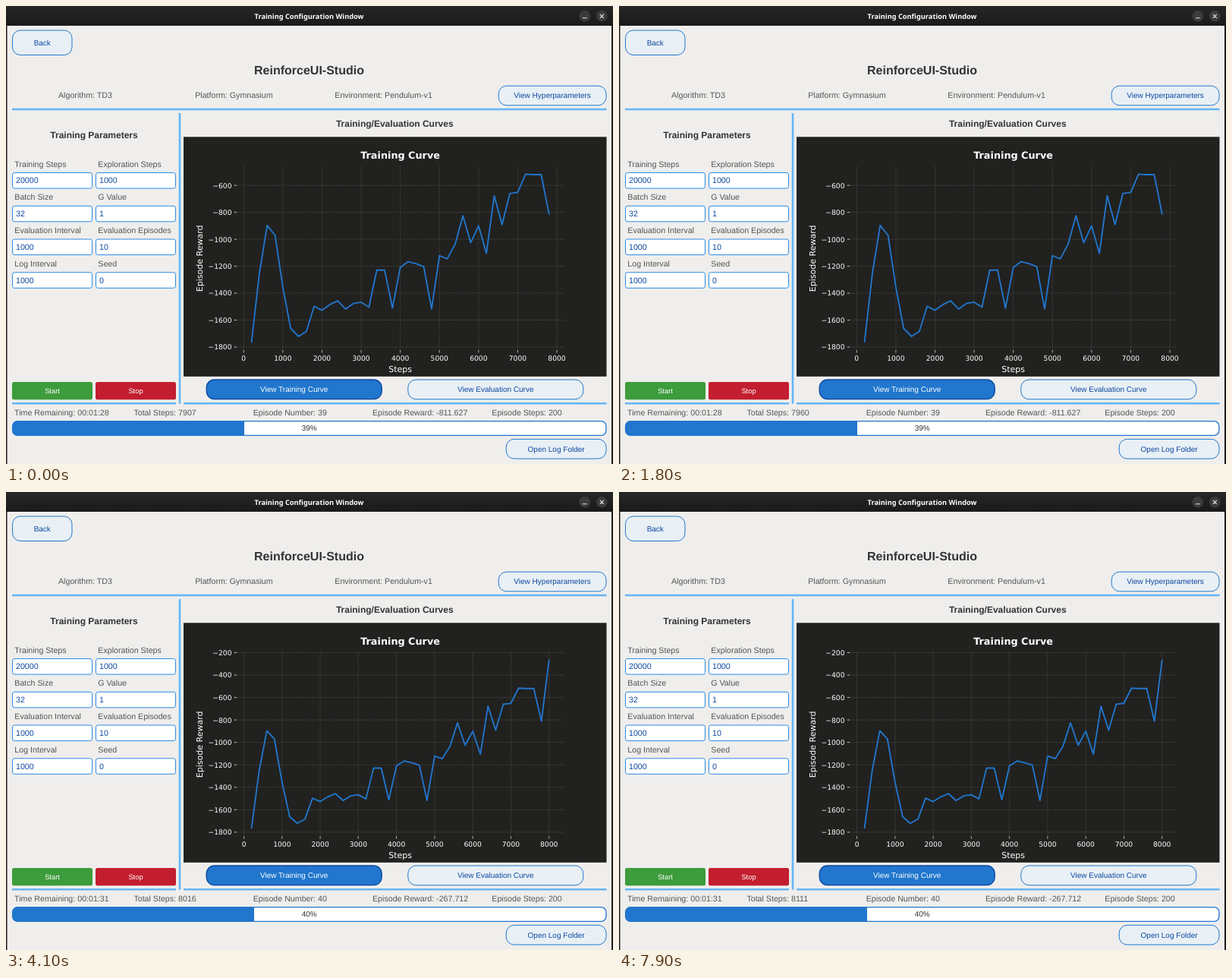
An HTML page for the animation above (8000 ms loop, 800 by 603 pixels).

```html
<!DOCTYPE html>
<html lang="en">
<head>
<meta charset="utf-8">
<title>Training Configuration Window</title>
<style>
  html, body { margin: 0; width: 100%; height: 100%; overflow: hidden; background: #1c1c1b; }
  svg { display: block; width: 100vw; height: 100vh; }
  text { font-family: "Liberation Sans", Arial, sans-serif; font-size: 10.67px; fill: #555; text-rendering: geometricPrecision; white-space: pre; }
  .head { font-weight: bold; font-size: 12px; fill: #333; }
  .button { font-size: 10px; fill: #0d47a1; }
  .value { fill: #0d47a1; }
  .plot text { font-family: "DejaVu Sans", sans-serif; font-size: 9.17px; fill: #fff; }
  .plot .axis { font-size: 11px; }
  .plot .caption { font-size: 12.8px; font-weight: bold; }
  .grid { stroke: #51514f; stroke-width: .6; stroke-dasharray: 2 .9; }
  .tick { stroke: #fff; stroke-width: .7; }
  .rule { stroke: #64b5f6; stroke-width: 2.6; }
</style>
</head>
<body>
<svg id="stage" viewBox="0 0 800 603" preserveAspectRatio="none"></svg>
<script>
const LOOP = 8000, STEP = 100;
const EPISODE_END = 3200, REDRAW = 3700;
const BLUE = '#2176cd';
const stage = document.getElementById('stage');

const rewards = [
  -1762, -1254, -897, -970, -1355, -1662, -1721, -1684, -1497, -1527,
  -1485, -1457, -1518, -1477, -1467, -1504, -1228, -1229, -1511, -1209,
  -1166, -1181, -1203, -1517, -1122, -1145, -1037, -826, -1026, -900,
  -1105, -677, -891, -660, -652, -517, -520, -520, -811.6, -267.7
];
// [time, total steps]
const progress = [
  [0, 7907], [1000, 7935], [1800, 7960], [EPISODE_END, 7999], [3500, 7999],
  [5300, 8050], [6700, 8086], [7900, 8111]
];

function add(parent, tag, attrs = {}, content = '') {
  const node = document.createElementNS('http://www.w3.org/2000/svg', tag);
  for (const key in attrs) node.setAttribute(key, attrs[key]);
  node.textContent = content;
  return parent.appendChild(node);
}
const label = (content, x, y, attrs = {}, parent = stage) => add(parent, 'text', { x, y, ...attrs }, content);
const centered = (content, x, y, cls, parent) => label(content, x, y, { class: cls, 'text-anchor': 'middle' }, parent);
const line = (parent, x1, y1, x2, y2, cls) => add(parent, 'line', { x1, y1, x2, y2, class: cls });
const box = (x, y, width, height, fill, attrs = {}) => add(stage, 'rect', { x, y, width, height, fill, ...attrs });

function button(content, x, y, width, height, active = false) {
  box(x + .5, y + .5, width - 1, height - 1, active ? BLUE : '#e8f0f5',
    { rx: 10.5, stroke: active ? '#0d47a1' : BLUE, 'stroke-width': active ? 1.3 : 1 });
  const text = centered(content, x + width / 2, y + height / 2 + 3.4, 'button');
  if (active) text.style.fill = '#fff';
}

function drawTitleBar() {
  const gradient = add(add(stage, 'defs'), 'linearGradient', { id: 'bar', x2: 0, y2: 1 });
  add(gradient, 'stop', { offset: 0, 'stop-color': '#272727' });
  add(gradient, 'stop', { offset: 1, 'stop-color': '#1a1a1a' });
  box(0, 0, 800, 603, '#1c1c1b');
  box(1.5, 26, 796.5, 577, '#efeeec');
  box(0, 0, 800, 26, 'url(#bar)');
  centered('Training Configuration Window', 399.5, 17)
    .setAttribute('style', 'font: bold 9.22px "Noto Sans", sans-serif; fill: #fff');
  for (const cx of [762.8, 785.3]) add(stage, 'circle', { cx, cy: 13.4, r: 7.3, fill: '#3b3b3b' });
  add(stage, 'path', { d: 'M760 15.7h5.6M782.8 10.9l5 5m0-5l-5 5', stroke: '#eee', 'stroke-width': 1.1 });
}

function drawHeader() {
  button('Back', 8, 31.5, 79.5, 33.5);
  const title = centered('ReinforceUI-Studio', 399.5, 90.3, 'head');
  title.style.fontSize = '16px';
  label('Algorithm: TD3', 69, 121.4);
  label('Platform: Gymnasium', 249.2, 121.4);
  label('Environment: Pendulum-v1', 433.3, 121.4);
  button('View Hyperparameters', 648.7, 104.7, 142.8, 26.6);
  line(stage, 8, 136, 791.5, 136, 'rule');
  line(stage, 229, 141, 229, 523.5, 'rule');
  line(stage, 8, 523.3, 224, 523.3, 'rule');
  line(stage, 234, 523.3, 791.5, 523.3, 'rule');
}

function drawForm() {
  centered('Training Parameters', 116, 173.6, 'head');
  const fields = [
    ['Training Steps', 20000], ['Exploration Steps', 1000],
    ['Batch Size', 32], ['G Value', 1],
    ['Evaluation Interval', 1000], ['Evaluation Episodes', 10],
    ['Log Interval', 1000], ['Seed', 0]
  ];
  fields.forEach(([name, value], i) => {
    const x = 8 + 110 * (i % 2), y = 219 + 43.75 * Math.floor(i / 2);
    label(name, x + 3.3, y - 7.4);
    box(x + .5, y + .5, 105, 20.6, '#fff', { rx: 2.7, stroke: '#2b8be6' });
    label(value, x + 5, y + 14.4, { class: 'value' });
  });
  [['Start', 8, '#3d9c3c'], ['Stop', 118, '#c31e2f']].forEach(([name, x, fill]) => {
    box(x, 495, 106, 23.3, fill, { rx: 2.5 });
    centered(name, x + 53, 510.2).setAttribute('style', 'font-size: 9.33px; fill: #fff');
  });
}

function drawPlot(count, xTicks, yTicks) {
  const left = 304, top = 210.4, width = 431.3, height = 242.9;
  const values = rewards.slice(0, count);
  const padX = 200 * (count - 1) * .05;
  const low = Math.min(...values), high = Math.max(...values), padY = (high - low) * .05;
  const px = v => left + width * (v - 200 + padX) / (200 * (count - 1) + 2 * padX);
  const py = v => top + height * (high + padY - v) / (high - low + 2 * padY);
  const plot = add(stage, 'g', { class: 'plot' });
  const right = left + width, bottom = top + height;

  for (const v of xTicks) {
    line(plot, px(v), bottom, px(v), top, 'grid');
    line(plot, px(v), bottom, px(v), bottom + 3.2, 'tick');
    centered(v, px(v), 466.8, '', plot);
  }
  for (const v of yTicks) {
    line(plot, left, py(v), right, py(v), 'grid');
    line(plot, left - 3.2, py(v), left, py(v), 'tick');
    label('\u2212' + -v, 297.5, py(v) + 3.4, { 'text-anchor': 'end' }, plot);
  }
  add(plot, 'polyline', {
    points: values.map((v, i) => px(200 * (i + 1)).toFixed(2) + ',' + py(v).toFixed(2)).join(' '),
    fill: 'none', stroke: BLUE, 'stroke-width': 1.85, 'stroke-linejoin': 'round', 'stroke-linecap': 'square'
  });
  centered('Training Curve', 519.6, 200.7, 'caption', plot);
  centered('Steps', 519.6, 482, 'axis', plot);
  centered('Episode Reward', 0, 0, 'axis', plot).setAttribute('transform', 'translate(258.5 332.3) rotate(-90)');
  return plot;
}

const range = (from, to, step) => Array.from({ length: Math.round((to - from) / step) + 1 }, (_, i) => from + i * step);

drawTitleBar();
drawHeader();
drawForm();
centered('Training/Evaluation Curves', 512.3, 159, 'head');
box(234, 172.3, 557.5, 315.5, '#21211f');
const xTicks = range(0, 8000, 1000);
const plotBefore = drawPlot(39, xTicks, range(-1800, -600, 200));
const plotAfter = drawPlot(40, xTicks, range(-1800, -200, 200));
button('View Training Curve', 263.7, 491.5, 232, 26.7, true);
button('View Evaluation Curve', 529.3, 491.5, 232, 26.7);
const status = range(0, 4, 1).map(i => label('', 11.1 + 157.3 * i, 538.7));
box(8.6, 546.6, 782.3, 18.8, '#fff', { rx: 6.5 });
const bar = add(stage, 'path', { fill: BLUE });
box(8.6, 546.6, 782.3, 18.8, 'none', { rx: 6.5, stroke: BLUE, 'stroke-width': 1.3 });
const percent = centered('', 399.7, 559.4, 'button');
percent.style.fill = '#333';
button('Open Log Folder', 658.7, 569.8, 132.8, 26.7);

function stepsAt(t) {
  const i = progress.findIndex(([time]) => time >= t);
  if (i <= 0) return progress[0][1];
  const [t0, a] = progress[i - 1], [t1, b] = progress[i];
  return Math.round(a + (b - a) * (t - t0) / (t1 - t0));
}

function render(time) {
  const t = Math.floor(time % LOOP / STEP) * STEP;
  const ended = t >= EPISODE_END, redrawn = t >= REDRAW;
  [
    'Time Remaining: 00:01:' + (ended ? 31 : 28),
    'Total Steps: ' + stepsAt(t),
    'Episode Number: ' + (ended ? 40 : 39),
    'Episode Reward: ' + (ended ? '-267.712' : '-811.627'),
    'Episode Steps: 200'
  ].forEach((content, i) => status[i].textContent = content);
  plotBefore.style.display = redrawn ? 'none' : '';
  plotAfter.style.display = redrawn ? '' : 'none';
  percent.textContent = redrawn ? '40%' : '39%';
  bar.setAttribute('d', `M${redrawn ? 327 : 314} 546.6V565.4H15a6.5 6.5 0 0 1-6.5-6.5v-5.8a6.5 6.5 0 0 1 6.5-6.5z`);
}

const start = performance.now();
function tick() {
  render(performance.now() - start);
  requestAnimationFrame(tick);
}
tick();
</script>
</body>
</html>
```
